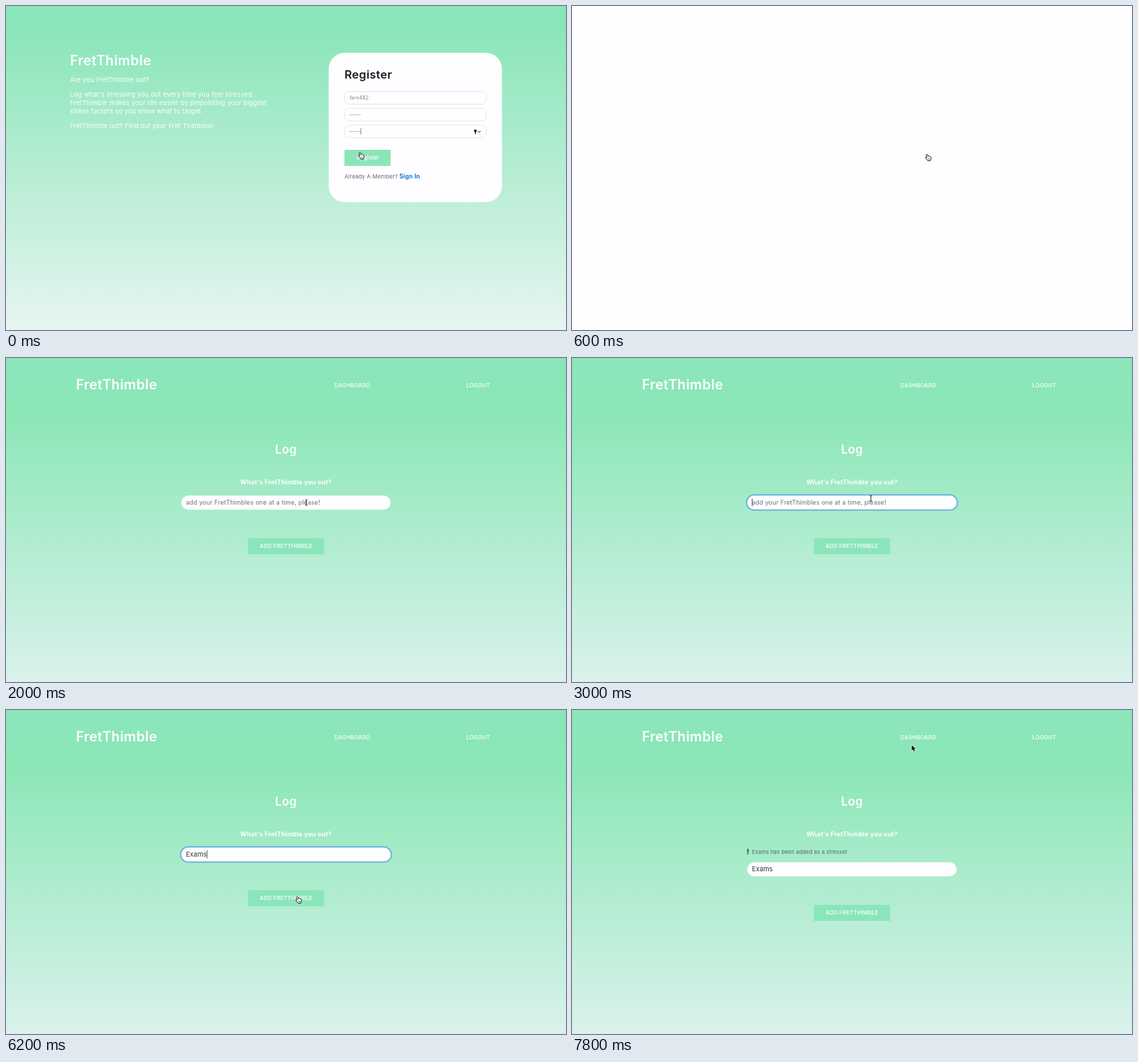
An HTML page with a canvas for the animation above (8 s loop, 800 by 464 pixels).

```html
<!DOCTYPE html>
<html lang="en">
<head>
<meta charset="utf-8">
<title>Stress log</title>
<style>
  html, body { margin: 0; width: 100%; height: 100%; overflow: hidden; background: #fefdff; }
  canvas { display: block; width: 100%; height: 100%; }
</style>
</head>
<body>
<canvas id="stage"></canvas>
<script>
const W = 800, H = 464, LOOP = 8000, STEP = 200;
const GREEN = '#8ae6b9', WHITE = '#fefdff';
const BRAND = 'FretThimble';

const canvas = document.getElementById('stage');
const ctx = canvas.getContext('2d');
const dpr = window.devicePixelRatio || 1;
canvas.width = W * dpr;
canvas.height = H * dpr;

function text(str, x, y, size, { weight = 400, color = WHITE, align = 'left' } = {}) {
  ctx.font = `${weight} ${size}px Inter, "Open Sans", sans-serif`;
  ctx.letterSpacing = `${size * 0.02}px`;
  ctx.textAlign = align;
  ctx.fillStyle = color;
  ctx.fillText(str, x, y);
  return ctx.measureText(str).width;
}

const centred = (str, x, y, size, weight) => text(str, x, y, size, { weight, align: 'center' });

function rect(x, y, w, h, color) {
  ctx.fillStyle = color;
  ctx.fillRect(x, y, w, h);
}

function round(x, y, w, h, r, fill, stroke, line = 1) {
  ctx.beginPath();
  ctx.roundRect(x, y, w, h, r);
  ctx.fillStyle = fill;
  ctx.fill();
  if (stroke) {
    ctx.strokeStyle = stroke;
    ctx.lineWidth = line;
    ctx.stroke();
  }
}

function backdrop(...stops) {
  const g = ctx.createLinearGradient(0, 0, 0, H);
  for (const [at, color] of stops) g.addColorStop(at, color);
  rect(0, 0, W, H, g);
}

function polyline(points, color, width) {
  ctx.beginPath();
  points.forEach(([x, y]) => ctx.lineTo(x, y));
  ctx.strokeStyle = color;
  ctx.lineWidth = width;
  ctx.stroke();
}

// Screens

function drawRegister() {
  backdrop([0, '#88e6b7'], [0.08, '#8be6b9'], [1, '#e7f5f1']);
  text(BRAND, 91.5, 85, 19.4, { weight: 600 });
  [
    [`Are you ${BRAND} out?`, 108.5],
    ["Log what's stressing you out every time you feel stressed.", 130],
    [`${BRAND} makes your life easier by pinpointing your biggest`, 142],
    ['stress factors so you know what to target.', 154],
    [`${BRAND} out? Find out your Fret Thimbles!`, 175.3]
  ].forEach(([line, y]) => text(line, 91.5, y, 9.2));

  round(461, 67, 247.5, 214, 23, WHITE);
  text('Register', 483.5, 104.3, 16.4, { weight: 600, color: '#1b1d21' });
  for (const y of [122.5, 146.7, 170.7]) round(483.5, y, 202.5, 18, 6, WHITE, '#e3e3e8', 0.8);
  text('fern482', 491, 133.8, 6.9, { color: '#7d8288' });
  for (const y of [155.3, 179.3])
    for (let i = 0; i < 8; i++) rect(491 + i * 2.05, y, 1, 1, '#6d7278');
  rect(506.6, 174.8, 0.7, 9.4, '#55595e');

  // Key and chevron
  ctx.beginPath();
  ctx.arc(670.5, 178.7, 2, 0, 7);
  ctx.fillStyle = '#1b1d21';
  ctx.fill();
  rect(669.9, 180, 1.3, 3.6, '#1b1d21');
  polyline([[673.8, 179], [675.8, 181], [677.8, 179]], '#1b1d21', 1);

  rect(483.5, 206, 66, 23, GREEN);
  centred('Register', 517, 220.2, 7.5, 600);
  text('Already A Member?', 483.5, 246.8, 7.9, { color: '#62676d' });
  text('Sign In', 562, 246.8, 8.5, { weight: 700, color: '#1a7bd0' });
}

function drawHeader(link) {
  backdrop([0, '#8ae6b9'], [0.17, '#8be7b6'], [1, '#daf2ec']);
  text(BRAND, 100, 45.3, 19.4, { weight: 600 });
  centred(link, 494.7, 41.8, 7.9, 500);
  centred('LOGOUT', 674.5, 41.8, 7.9, 500);
}

function drawWelcome() {
  drawHeader('INSIGHTS');
  centred('Welcome!', 400, 140.4, 20.4, 600);
  centred(`What's ${BRAND} you out today?`, 400, 167, 8.95, 700);
  rect(337.5, 196, 125, 23, GREEN);
  centred('LOG YOUR STRESSORS', 400, 210.7, 7.9, 500);
}

function drawLog({ typed, focus, caret, added }) {
  const dy = added ? 21 : 0;
  drawHeader('DASHBOARD');
  centred('Log', 400, 137.2, 16.7, 600);
  centred(`What's ${BRAND} you out?`, 400, 181, 8.95, 700);
  if (added) {
    rect(250.3, 198.8, 1.9, 5, '#3d4a45');
    rect(250.3, 204.6, 1.9, 1.8, '#3d4a45');
    text('Exams has been added as a stresser.', 257, 205.6, 7.6, { color: '#53655e' });
  }
  if (focus) round(249.4, 196, 301.2, 21.8, 10.9, WHITE, '#72b7dc', 2);
  else round(250.3, 197 + dy, 299.2, 20.2, 10.1, WHITE);

  const y = 210 + dy;
  let end = 257;
  if (typed) end += text(typed, 257, y, 9.3, { color: '#2c3036' });
  else text(`add your ${BRAND}s one at a time, please!`, 257, y, 8.8, { color: '#6b7178' });
  if (caret) rect(end - 0.1, y - 9, 0.8, 11.5, '#30343a');

  rect(345.5, 258 + dy, 109, 23, GREEN);
  centred(`ADD ${BRAND.toUpperCase()}`, 400, 271.8 + dy, 7.85, 500);
}

// Pointers, drawn around their centre

const HAND = new Path2D(
  'M-2.6 -4.4 C-2 -5.2 -1 -4.6 -.8 -3.8 L-.3 -1.8 C.3 -2.4 1.2 -2.2 1.4 -1.5 ' +
  'C2 -2 2.7 -1.6 2.9 -1 C3.6 -1.2 4.1 -.6 4.1 .2 L3.9 2 L3.1 3.4 L3.1 4.6 L-.9 4.6 ' +
  'L-1.3 3.5 L-3.9 .9 C-4.4 0 -3.4 -.7 -2.6 -.2 L-1.9 .3 L-2.9 -3.4 Z');
const ARROW = new Path2D('M-2.6 -4.8 L-2.6 3.2 L-.8 1.6 L.4 4.5 L1.9 3.9 L.7 1.1 L3 1 Z');

const pointers = {
  hand() {
    ctx.fillStyle = '#fff';
    ctx.fill(HAND);
    ctx.strokeStyle = '#17191c';
    ctx.lineWidth = 1;
    ctx.stroke(HAND);
    for (const x of [0, 1.5]) polyline([[x, 1.2], [x + 0.2, 3]], '#17191c', 0.6);
  },
  arrow() {
    ctx.strokeStyle = '#fff';
    ctx.lineWidth = 1.2;
    ctx.stroke(ARROW);
    ctx.fillStyle = '#111';
    ctx.fill(ARROW);
  },
  beam() {
    rect(-0.5, -4, 1, 8, '#222');
    rect(-1.6, -4.4, 3.2, 0.8, '#222');
    rect(-1.6, 3.6, 3.2, 0.8, '#222');
  }
};

// [time, x, y]
const PATH = [
  [0, 507.5, 214.5], [400, 509, 217], [800, 509, 217], [1600, 429, 207],
  [2000, 429, 207], [3000, 427, 201], [3600, 427, 203], [6000, 430, 314],
  [6200, 418, 272], [7000, 418, 272], [7800, 488, 55], [LOOP, 488, 55]
];
// [start time, pointer]
const KINDS = [
  [0, 'hand'], [1000, 'arrow'], [1400, 'hand'], [1800, 'arrow'], [2000, 'beam'],
  [3800, null], [6000, 'arrow'], [6200, 'hand'], [6600, 'arrow']
];

const smooth = k => k * k * (3 - 2 * k);

function drawPointer(t) {
  const kind = KINDS.findLast(([start]) => start <= t)[1];
  if (!kind) return;
  const i = PATH.findLastIndex(([at]) => at <= t);
  const [t0, x0, y0] = PATH[i];
  const [t1, x1, y1] = PATH[i + 1];
  const k = smooth((t - t0) / (t1 - t0));
  ctx.save();
  ctx.translate(x0 + (x1 - x0) * k, y0 + (y1 - y0) * k);
  pointers[kind]();
  ctx.restore();
}

function logState(t) {
  const chars = Math.max(0, Math.floor((t - 4800) / STEP));
  const focus = t >= 2600 && t < 6600;
  const blink = t < 5000 ? Math.floor((t - 2600) / 600) % 2 === 0 : t !== 6400;
  return { typed: 'Exams'.slice(0, chars), focus, caret: focus && blink, added: t >= 6600 };
}

function draw(t) {
  ctx.setTransform(dpr, 0, 0, dpr, 0, 0);
  if (t < 600) drawRegister();
  else if (t < 800) rect(0, 0, W, H, WHITE);
  else if (t < 1800) drawWelcome();
  else drawLog(logState(t));
  drawPointer(t);
}

const start = performance.now();
function tick() {
  const t = (performance.now() - start) % LOOP;
  draw(Math.floor(t / STEP) * STEP);
  requestAnimationFrame(tick);
}
tick();
</script>
</body>
</html>
```
